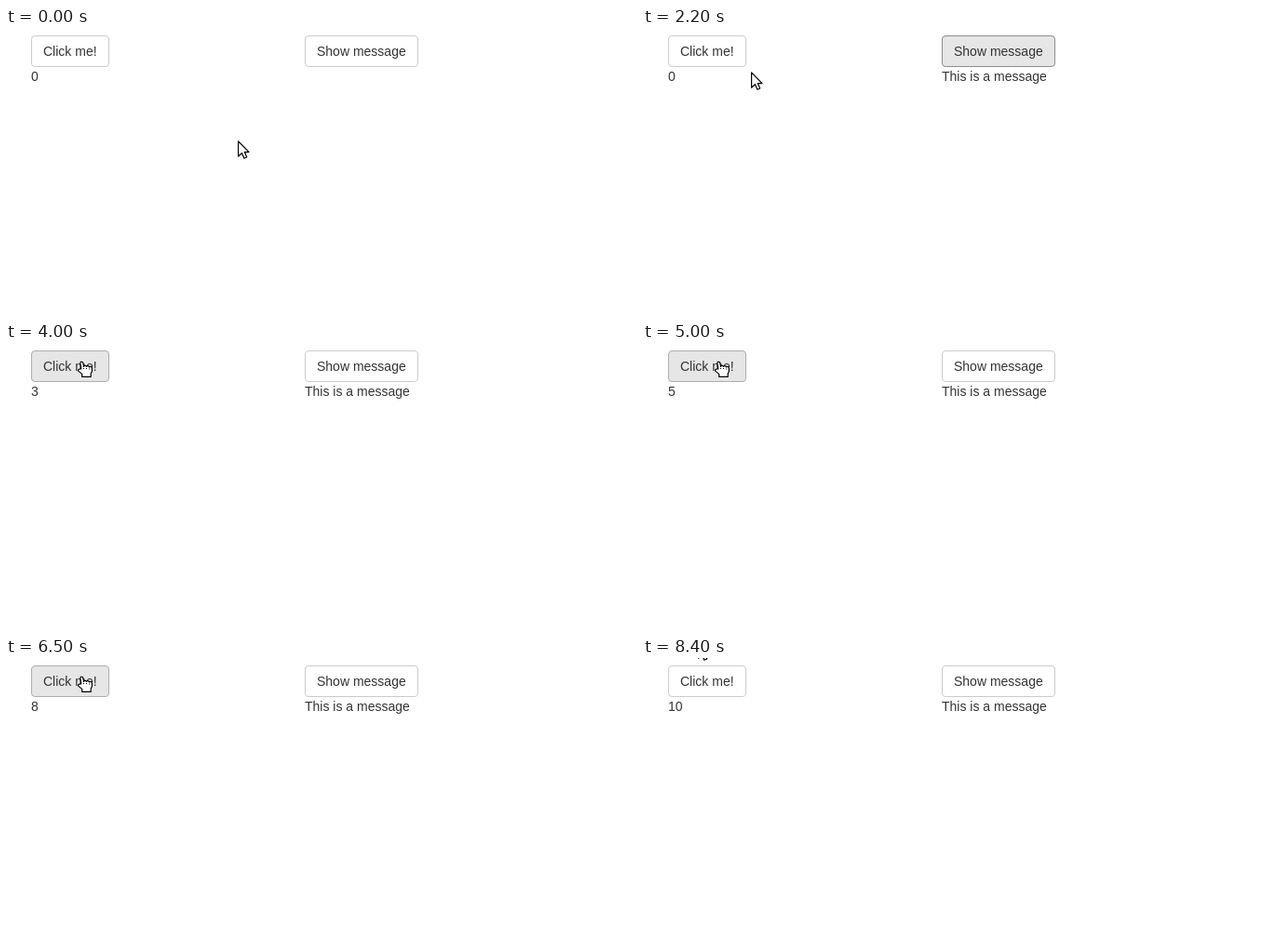
Recreate the animation shown at these times as an HTML page. Size 678 by 309 pixels, loop 8.6 s.

```html
<!DOCTYPE html>
<html lang="en">
<head>
<meta charset="utf-8">
<title>Buttons</title>
<style>
html, body { margin: 0; width: 100%; height: 100%; overflow: hidden; background: #fff; }
body { position: relative; font: 14px/20px "Liberation Sans", Arial, sans-serif; color: #333; cursor: default; }
.col { position: absolute; top: 8px; }
.btn { display: inline-block; vertical-align: top; box-sizing: border-box; height: 34px; padding: 6px 12px;
  border: 1px solid #ccc; border-radius: 4px; background: #fff; white-space: nowrap; }
.btn.focus { background: #e6e6e6; border-color: #8c8c8c; }
.btn.hover { background: #e6e6e6; border-color: #adadad; }
.btn.press { background: #d4d4d4; border-color: #8c8c8c; box-shadow: inset 0 3px 5px rgba(0,0,0,.125); }
svg { position: absolute; left: 0; top: 0; width: 24px; height: 24px; overflow: visible; }
svg path { fill: #fff; stroke: #000; stroke-width: 1.2; stroke-linejoin: round; }
#hand .knuckles { fill: none; stroke-width: 1; stroke-dasharray: 1 1; }
</style>
</head>
<body>
<div class="col" style="left:27px"><div class="btn" id="click">Click me!</div><div id="count">0</div></div>
<div class="col" style="left:321px"><div class="btn" id="show">Show message</div><div id="message"></div></div>
<svg id="arrow"><path d="M.6 .9V17.2L4.4 13.7L6.9 19.2L9.7 18L7.3 12.6H12Z"/></svg>
<svg id="hand">
  <path d="M-1.2 8L-2.2 1.8Q-2 .1 -.6 .2Q.6 .2 .9 1.8L1.4 5Q3 4 4.4 4.9Q6 4.3 7.2 5.3Q10.4 5 10.4 7.6V10.6L9.2 13V16.3H-.3V13.4L-4 10.4Q-5 8.9 -3.6 8.2Q-2.4 7.8 -1.2 8Z"/>
  <path class="knuckles" d="M1.5 5V9M4.5 5V9M7.5 5.5V9"/>
</svg>
<script>
const LOOP = 8600, TICK = 100;
const SHOW = 1200, FIRST_CLICK = 2900, LAST_CLICK = 7400, PERIOD = 500, BLUR = 8400;
const $ = id => document.getElementById(id);

// pointer strokes: times of first and last step, curve control point, end point
const home = { x: 249, y: 121 };
const moves = [
  { first: 600, last: 1000, cx: 310, cy: 60, x: 370, y: 27 },
  { first: 1800, last: 2500, cx: 240, cy: 170, x: 84, y: 19 },
  { first: 2700, last: 2700, cx: 83, cy: 20, x: 82, y: 20 },
  { first: 7700, last: 8000, cx: 72, cy: 2, x: 59, y: -17 }
];

const ease = p => 1 - (1 - p * p) ** 4.6;
const bezier = (a, c, b, u) => Math.round(a * (1 - u) ** 2 + 2 * c * u * (1 - u) + b * u * u);

function pointer(t) {
  let at = home;
  for (const m of moves) {
    if (t < m.first) break;
    const u = ease(Math.min(1, (t - m.first + TICK) / (m.last - m.first + TICK)));
    at = { x: bezier(at.x, m.cx, m.x, u), y: bezier(at.y, m.cy, m.y, u) };
  }
  return at;
}

function style(btn, at, focus, press) {
  const box = btn.getBoundingClientRect();
  const hover = at.x >= box.left && at.x < box.right && at.y >= box.top && at.y < box.bottom;
  btn.classList.toggle("focus", focus);
  btn.classList.toggle("hover", hover);
  btn.classList.toggle("press", press);
  return hover;
}

function draw(t) {
  const at = pointer(t);
  const sinceClick = t - FIRST_CLICK;
  const clicking = sinceClick >= 0 && t < LAST_CLICK + TICK;
  const onClick = style($("click"), at, sinceClick >= 0 && t < BLUR, clicking && sinceClick % PERIOD < TICK);
  const onShow = style($("show"), at, t >= SHOW && sinceClick < 0, t >= SHOW && t < SHOW + TICK);

  // each press takes effect on release, one tick later
  const released = Math.min(t, LAST_CLICK + TICK) - FIRST_CLICK - TICK;
  $("count").textContent = Math.max(0, Math.floor(released / PERIOD) + 1);
  $("message").textContent = t >= SHOW + TICK ? "This is a message" : "";

  const over = onClick || onShow;
  for (const id of ["arrow", "hand"]) {
    $(id).style.transform = `translate(${at.x}px, ${at.y}px)`;
    $(id).style.display = (id === "hand") === over ? "block" : "none";
  }
}

const start = performance.now();
function frame() {
  const t = (performance.now() - start) % LOOP;
  draw(Math.floor(t / TICK) * TICK);
  requestAnimationFrame(frame);
}
frame();
</script>
</body>
</html>
```
